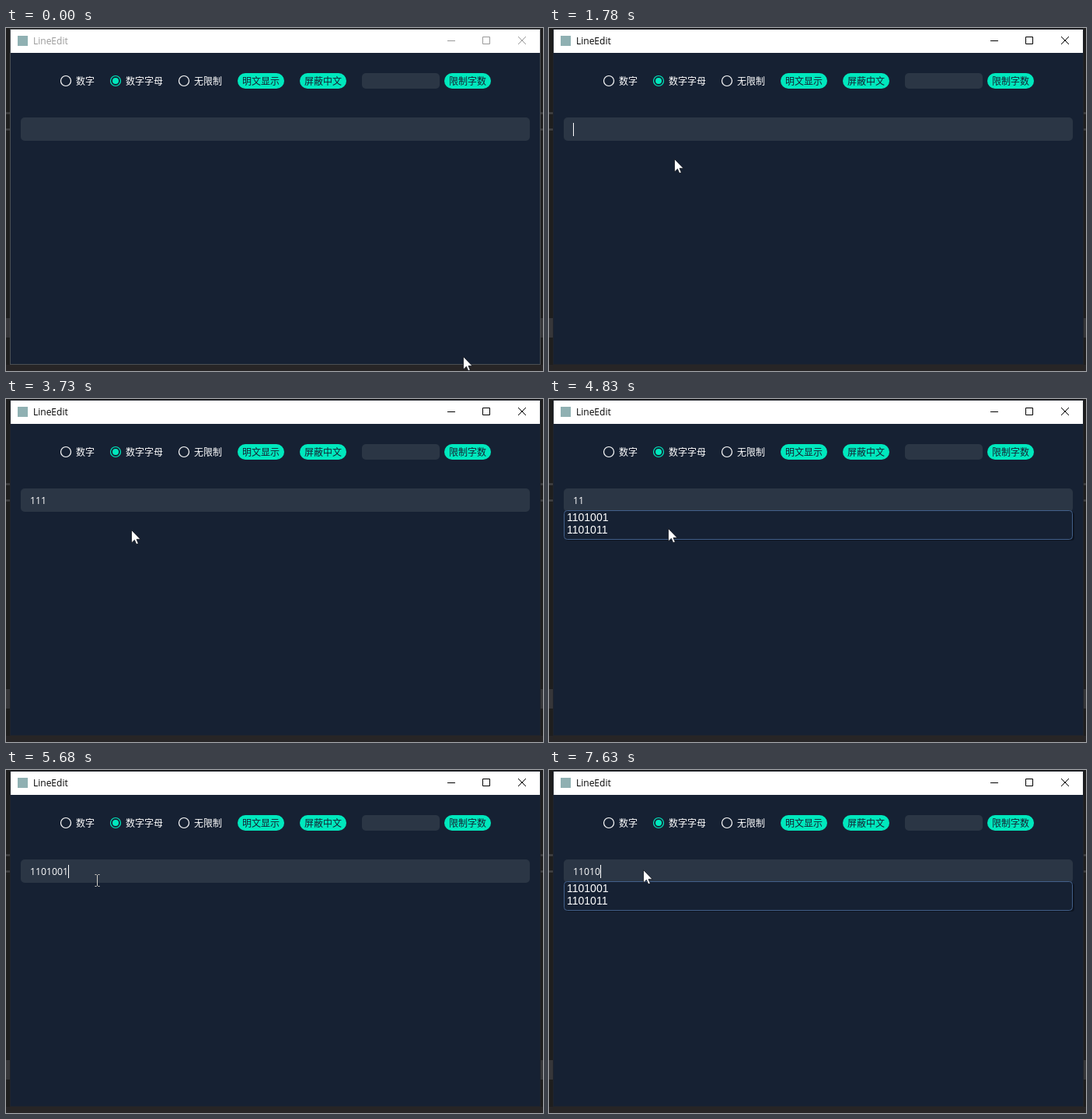
Animation of 691x441 px, one loop 8000 ms. Source, as an HTML page:

```html
<!DOCTYPE html>
<html lang="zh">
<head>
<meta charset="utf-8">
<title>LineEdit</title>
<style>
  html, body { margin: 0; width: 100%; height: 100%; overflow: hidden; background: #1e1e1e; }
  svg { display: block; width: 100vw; height: 100vh; }
  text { white-space: pre; }
  .title { font: 12px "Open Sans", "Noto Sans", sans-serif; }
  .label { font: 12px "Noto Sans CJK SC", "Noto Sans CJK", sans-serif; fill: #fff; }
  .dark { fill: #162133; }
  .entry { font: 12.25px "Open Sans", "Noto Sans", sans-serif; fill: #fff; }
  .item { font: 14px "Liberation Sans", Arial, sans-serif; fill: #fff; }
</style>
</head>
<body>
<svg viewBox="0 0 691 441" preserveAspectRatio="none">
  <rect width="691" height="441" fill="#1e1e1e"/>
  <path d="M0 109.5H691M0 130.5H691" stroke="#414143" stroke-width="2.5"/>
  <rect y="373" width="691" height="25" fill="#363639"/>
  <rect y="433" width="691" height="8" fill="#272526"/>
  <rect x="6" y="2" width="681" height="430" fill="#162133"/>
  <rect x="6" y="2" width="681" height="30" fill="#fff"/>
  <rect id="frame" x="5.5" y="1.5" width="682" height="431" fill="none"/>
  <rect x="15" y="10" width="13" height="13" fill="#8fb0b2"/>
  <text id="title" class="title" x="35" y="21">LineEdit</text>
  <path id="buttons" d="M568 16.5H578M613.5 11.5H622.5V20.5H613.5ZM659 11L669 21M669 11L659 21" fill="none"/>
  <g id="controls"></g>
  <rect x="19" y="115" width="655" height="30" rx="5" fill="#2b3645"/>
  <rect id="selection" y="122" height="17" fill="#0078d7"/>
  <text id="entry" class="entry" x="31" y="135"></text>
  <rect id="caret" y="122" width="1" height="17" fill="#fff"/>
  <g id="popup">
    <rect id="shadow" x="21" y="145" width="655" rx="4" fill="#0d1420"/>
    <rect id="list" x="19.5" y="143.5" width="654" rx="4" fill="#162133" stroke="#42608a"/>
    <rect id="highlight" x="20.5" y="144.5" width="652" height="15" fill="#0078d7" stroke="#7fc0f0" stroke-dasharray="1 1"/>
    <text id="row0" class="item" x="23" y="157"></text>
    <text id="row1" class="item" x="23" y="173"></text>
  </g>
  <path id="arrow" d="M.5.5V17L4.4 13.3L6.8 18.8L9.3 17.7L7 12.4H12Z" fill="#fff" stroke="#10141c" stroke-width=".8"/>
  <path id="beam" d="M-3 -7.5H-1M1 -7.5H3M0 -7V7M-3 7.5H-1M1 7.5H3" transform="translate(0 0)" fill="none" stroke="#d4d0c8"/>
  <circle id="click" r="12" fill="#fff000" fill-opacity=".5"/>
</svg>
<script>
const LOOP = 8000, CHAR = 7, LEFT = 31;
const $ = id => document.getElementById(id);
const set = (id, attrs) => { for (const k in attrs) $(id).setAttribute(k, attrs[k]); };
const show = (id, on) => set(id, { visibility: on ? 'inherit' : 'hidden' });

const radio = (x, label, on) =>
  `<circle cx="${x}" cy="68" r="6.5" fill="none" stroke="${on ? '#00e8bd' : '#fff'}" stroke-width="1.2"/>` +
  (on ? `<circle cx="${x}" cy="68" r="4" fill="#00e8bd"/>` : '') +
  `<text class="label" x="${x + 13}" y="73">${label}</text>`;
const pill = (x, label) =>
  `<rect x="${x}" y="58" width="60" height="20" rx="10" fill="#00e8bd"/>` +
  `<text class="label dark" x="${x + 6}" y="73">${label}</text>`;
$('controls').innerHTML =
  radio(77, '数字') + radio(141, '数字字母', true) + radio(229, '无限制') +
  pill(298, '明文显示') + pill(378, '屏蔽中文') + pill(564, '限制字数') +
  '<rect x="458" y="58" width="100" height="20" rx="5" fill="#2b3645"/>';

// Each entry: start time and the values that change from then on.
const both = ['1101001', '1101011'], first = both.slice(0, 1);
const changes = [
  [0, { text: '', selectFrom: null, caret: false, rows: [], chosen: false, active: false }],
  [700, { active: true, caret: true }],
  [1150, { caret: false }],
  [1680, { caret: true }],
  [1850, { text: '1', rows: ['1'] }],
  [2330, { text: '1101001', selectFrom: 2, rows: first }],
  [2880, { caret: false }],
  [3030, { text: '111', selectFrom: null, caret: true, rows: [] }],
  [3730, { caret: false }],
  [4130, { text: '11', caret: true, rows: both }],
  [4600, { caret: false }],
  [5130, { caret: true }],
  [5210, { text: '1101001', chosen: true }],
  [5290, { rows: [], chosen: false }],
  [5760, { caret: false }],
  [6220, { caret: true }],
  [6690, { rows: first }],
  [7230, { text: '110100' }],
  [7630, { text: '11010', rows: both }]
];

// Pointer moves: first step, last step, number of steps, end point.
const moves = [
  [70, 380, 5, 96, 99],
  [455, 530, 2, 80, 124],
  [850, 1150, 5, 131, 132],
  [1320, 1780, 7, 161, 168],
  [4830, 4830, 1, 153, 166],
  [4905, 5055, 3, 118, 148],
  [5610, 5760, 3, 114, 130],
  [6220, 6380, 3, 124, 130],
  [6530, 6530, 1, 123, 129.5],
  [6690, 6690, 1, 121, 128]
];
const clicks = [[700, 850], [5130, 5290], [5910, 5990]];

function pointerAt(t) {
  let x = 588, y = 422;
  for (const [start, end, steps, toX, toY] of moves) {
    if (t < start) break;
    const gap = (end - start) / (steps - 1) || 1;
    const p = Math.min(1, (Math.floor((t - start) / gap) + 1) / steps);
    x += (toX - x) * p;
    y += (toY - y) * p;
  }
  return { x: Math.round(x), y: Math.round(y) };
}

function draw(t) {
  const s = Object.assign({}, ...changes.filter(c => c[0] <= t).map(c => c[1]));
  const ink = s.active ? '#000' : '#999';
  set('title', { fill: ink });
  set('buttons', { stroke: ink });
  set('frame', { stroke: s.active ? '#20242c' : '#4b4f54' });

  const end = LEFT + CHAR * s.text.length;
  $('entry').textContent = s.text;
  set('caret', { x: end });
  show('caret', s.caret);
  const from = s.selectFrom === null ? end : LEFT + CHAR * s.selectFrom;
  set('selection', { x: from, width: end - from });

  const open = s.rows.length > 0, height = 5 + 16 * s.rows.length;
  show('popup', open);
  set('list', { height });
  set('shadow', { height });
  show('highlight', s.chosen);
  $('row0').textContent = s.rows[0] || '';
  $('row1').textContent = s.rows[1] || '';

  const { x, y } = pointerAt(t);
  const editing = !open && y > 115 && y < 145;
  set('arrow', { transform: `translate(${x} ${y})` });
  set('beam', { transform: `translate(${x + .5} ${y})` });
  show('arrow', !editing);
  show('beam', editing);
  set('click', { cx: x, cy: y });
  show('click', clicks.some(([a, b]) => t >= a && t < b));
}

const began = performance.now();
function tick() {
  draw((performance.now() - began) % LOOP);
  requestAnimationFrame(tick);
}
tick();
</script>
</body>
</html>
```
